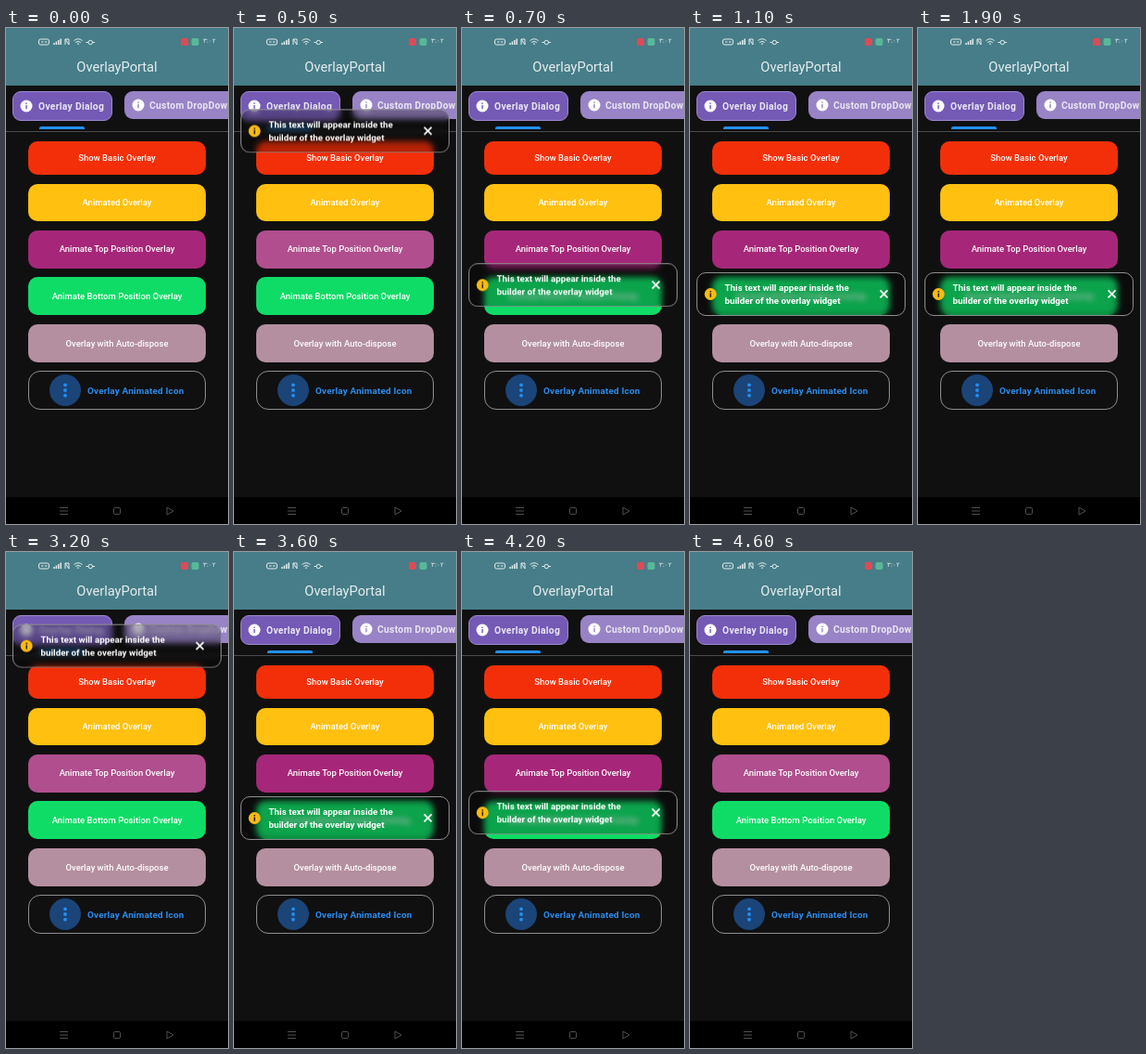
Write an HTML page that moves like this. It is 240 by 534 pixels and loops after 4700 ms.

```html
<!DOCTYPE html>
<html lang="en">
<head>
<meta charset="utf-8">
<title>Overlay demo</title>
<style>
  html, body { margin: 0; width: 100%; height: 100%; overflow: hidden; background: #101010; }
  #stage { position: relative; width: 240px; height: 534px; overflow: hidden; background: #101010;
    color: #fff; font: 500 9.5px Roboto, sans-serif; white-space: nowrap; }
  #stage > * { position: absolute; box-sizing: border-box; }
  svg { display: block; overflow: visible; }
  header { left: 0; top: 0; width: 240px; height: 61.5px; background: #467d88; }
  h1 { left: 0; top: 33px; width: 240px; margin: 0; text-align: center; color: #e6eef0;
    font-size: 14.65px; font-weight: 400; line-height: 19px; }
  .tab { top: 68px; height: 31.5px; border-radius: 9px; font-weight: 700; font-size: 10.3px;
    letter-spacing: .3px; line-height: 31px; color: #e9e6f1; }
  .tab svg { position: absolute; left: 7px; top: 8px; }
  .tab span { position: absolute; left: 27px; }
  #dialog { left: 7px; width: 108px; background: #7459b5; border: 1px solid #9f8ace; }
  #drop { left: 128px; width: 150px; height: 29.5px; background: #9883c6; }
  #drop svg { top: 7.5px; left: 8px; }
  #mark { left: 36px; top: 106px; width: 48.5px; height: 2.5px; background: #2390f0; border-radius: 2px 2px 0 0; }
  #rule { left: 0; top: 110.5px; width: 240px; height: 1px; background: #4b4b4d; }
  .btn { left: 24px; width: 192px; border-radius: 10px; text-align: center; }
  #icon { left: 24px; top: 369px; width: 192px; height: 42px; border: 1px solid #8e8e8e; border-radius: 13px;
    color: #2b8df0; font-weight: 700; font-size: 9.9px; letter-spacing: .2px; line-height: 41px; }
  #icon svg { position: absolute; left: 22px; top: 3px; }
  #icon span { position: absolute; left: 63px; }
  #card { left: 7px; top: 0; width: 226px; height: 47px; border: 1px solid #8e8e8e; border-radius: 10px;
    background: rgba(0, 0, 0, .26); backdrop-filter: blur(3.3px); font-weight: 700; font-size: 9.8px; line-height: 14px; }
  #card p { position: absolute; left: 29.5px; top: 8.5px; margin: 0; }
  #card svg { position: absolute; left: 0; top: 0; }
  nav { left: 0; top: 504.5px; width: 240px; height: 29.5px; background: #000; }
  #clock { left: 213px; top: 9px; color: #e4edef; font: 7px/11px "DejaVu Sans", sans-serif;
    direction: ltr; unicode-bidi: bidi-override; }
</style>
</head>
<body>
<div id="stage">
  <header></header>
  <svg id="status" width="240" height="30" fill="none" stroke="#e4edef" stroke-width="1">
    <rect x="35.5" y="12" width="11" height="6" rx="2"/>
    <path d="M38 15h2.5M42 15h2.5"/>
    <path stroke-width="1.5" d="M52 18v-2M54.4 18v-3.5M56.8 18v-5M59.2 18v-6.5"/>
    <path d="M64 18v-6l4 6v-6M64 12h4"/>
    <path d="M73.5 13.5q4.5-3.5 9 0M75.2 15.5q2.8-2.2 5.6 0M77 17.3q1-.8 2 0"/>
    <path d="M86.5 15.5h2.5M93.5 15.5h2.5"/>
    <circle cx="91.3" cy="15.5" r="2.2"/>
    <g stroke="none">
      <rect x="189" y="11" width="8" height="8" rx="2" fill="#de4a54"/>
      <rect x="200.5" y="11" width="8" height="8" rx="2" fill="#58b898"/>
    </g>
  </svg>
  <span id="clock">٣:٠٢</span>
  <h1>OverlayPortal</h1>
  <div id="dialog" class="tab"><span>Overlay Dialog</span></div>
  <div id="drop" class="tab"><span>Custom DropDown</span></div>
  <div id="mark"></div>
  <div id="rule"></div>
  <div id="icon">
    <svg width="34" height="34">
      <circle cx="17" cy="17" r="17" fill="#1b4478"/>
      <g fill="#2390f0"><circle cx="17" cy="11.3" r="1.9"/><circle cx="17" cy="17" r="1.9"/><circle cx="17" cy="22.7" r="1.9"/></g>
    </svg>
    <span>Overlay Animated Icon</span>
  </div>
  <nav>
    <svg width="240" height="29" fill="none" stroke="#505050">
      <path d="M58 11.5h9M58 15h9M58 18.5h9"/>
      <rect x="116.5" y="11.5" width="7" height="7" rx="1.2"/>
      <path d="M174 11l7 4-7 4z"/>
    </svg>
  </nav>
  <div id="card">
    <svg width="224" height="45" fill="none">
      <path d="M197.6 18.4l8 8m0-8l-8 8" stroke="#fff" stroke-width="1.7"/>
    </svg>
    <p>This text will appear inside the<br>builder of the overlay widget</p>
  </div>
</div>
<script>
const LOOP = 4700, STEP = 100;
const BASE = '#a62779', LIT = '#b04e8e';
const $ = id => document.getElementById(id);

const buttons = [
  ['Show Basic Overlay', 122, 35.5, '#f22f08'],
  ['Animated Overlay', 167.5, 40.5, '#ffc010'],
  ['Animate Top Position Overlay', 218, 40.5, BASE],
  ['Animate Bottom Position Overlay', 268, 41, '#0fdc66'],
  ['Overlay with Auto-dispose', 318.5, 41, '#b48f9f']
].map(([text, top, height, background]) => {
  const b = document.createElement('div');
  b.className = 'btn';
  b.textContent = text;
  Object.assign(b.style, { top: top + 'px', height: height + 'px', lineHeight: height + 'px', background });
  $('stage').insertBefore(b, $('icon'));
  return b;
});

const info = (x, y, disc, mark) =>
  `<g transform="translate(${x} ${y})"><circle r="6.5" fill="${disc}"/>` +
  `<path d="M0 -3.4v1.4M0 -.9v4.2" stroke="${mark}" stroke-width="1.4"/></g>`;

function tabIcon(id, mark) {
  $(id).insertAdjacentHTML('afterbegin', `<svg width="14" height="14">${info(7, 7, '#fff', mark)}</svg>`);
}
tabIcon('dialog', '#7459b5');
tabIcon('drop', '#9883c6');
$('card').querySelector('svg').insertAdjacentHTML('beforeend', info(14.2, 22.5, '#fbb912', '#1b1710'));

// Rows: time in ms, value, easing towards the next row
function play(el, prop, rows, format = v => v) {
  const frames = rows.map(([t, v, easing = 'steps(1)']) => ({ offset: t / LOOP, [prop]: format(v), easing }));
  const anim = el.animate(frames, { duration: LOOP, iterations: Infinity });
  anim.pause();
  return anim;
}

const HIDE = -60, REST = 263;
const BACK = 'cubic-bezier(.75, 0, .75, .9)';
const anims = [
  play($('card'), 'transform', [
    [0, HIDE], [395, 0], [420, 0, 'ease'], [790, REST], [1930, REST, BACK], [2295, 0], [2295, HIDE],
    [3126, HIDE], [3126, 0, 'ease'], [3496, REST], [4130, REST, BACK], [4495, 0], [4495, HIDE], [LOOP, HIDE]
  ], y => `translateY(${y}px)`),
  play(buttons[2], 'backgroundColor', [
    [0, BASE], [295, LIT], [695, BASE], [3095, LIT], [3395, BASE], [4595, LIT], [LOOP, LIT]
  ])
];

const start = performance.now();
function tick() {
  const t = (performance.now() - start) % LOOP;
  const now = Math.floor(t / STEP) * STEP;
  for (const a of anims) a.currentTime = now;
  requestAnimationFrame(tick);
}
tick();
</script>
</body>
</html>
```
